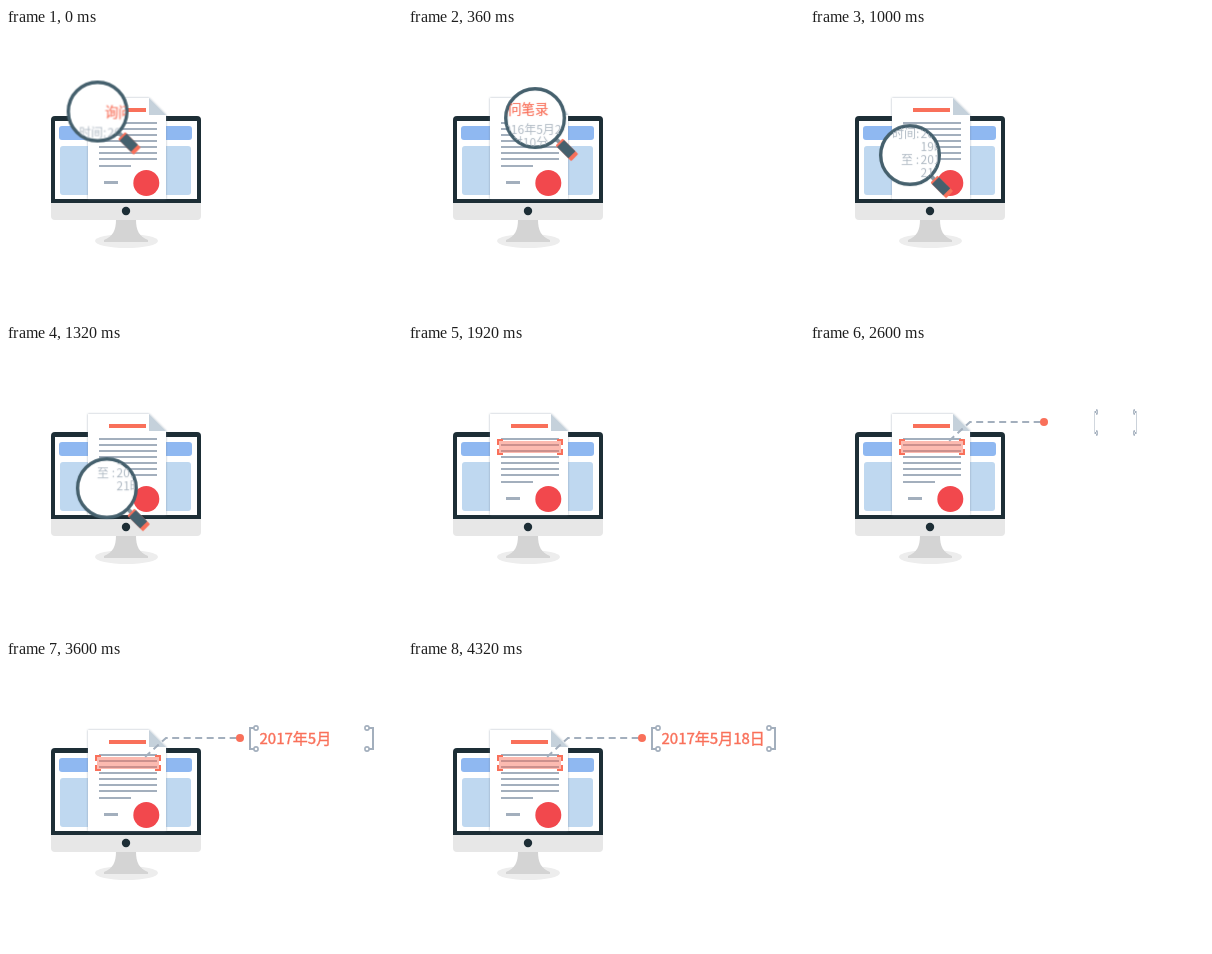
Animation, 396 px wide and 288 px high, one loop 5 s. Source, as an HTML page:

```html
<!DOCTYPE html>
<html lang="zh">
<head>
<meta charset="utf-8">
<title>Document date lookup</title>
<style>
  :root { --coral: #f9705a; --gray: #a3afbd; --slate: #45606d; --dark: #1d2e36; }
  html, body { margin: 0; width: 100%; height: 100%; overflow: hidden; background: #fff; }
  body { position: relative; font-family: "Noto Sans CJK SC", "Noto Sans CJK", "Noto Sans", sans-serif; }
  svg { display: block; width: 396px; height: 288px; }

  .lens, .note, .mark, .trail, .dot, .frame, .date { animation: 5s linear infinite; }
  .lens { animation-name: lens, lens-out; }
  .note { animation-name: note; }
  .mark { animation-name: mark; }
  .trail { animation-name: trail; stroke-dasharray: 100 200; }
  .dot { animation-name: dot; transform-origin: 234px 78px; }
  .frame { animation-name: frame; transform-origin: 305.5px 78px; }

  .title { font-size: 13.3px; fill: var(--coral); stroke: var(--coral); stroke-width: .2; }
  .rows { font-size: 12px; fill: #b0bac4; }

  .date {
    position: absolute; left: 253.5px; top: 69px; height: 18px;
    font-size: 15px; line-height: 18px; color: var(--coral);
    -webkit-text-stroke: .4px var(--coral);
    white-space: nowrap; overflow: hidden;
    animation-name: type, pulse;
    animation-timing-function: step-end, linear;
  }

  @keyframes lens {
    0% { transform: translate(91.5px, 83.5px); }
    3.6% { transform: translate(111px, 85.5px); }
    7.2% { transform: translate(127px, 90px); }
    9.2% { transform: translate(133.5px, 95.5px); }
    11.2% { transform: translate(138px, 102px); }
    15.6% { transform: translate(122px, 112px); }
    20% { transform: translate(100px, 127px); }
    22.4% { transform: translate(95px, 140px); }
    32%, 100% { transform: translate(109px, 150px); }
  }
  @keyframes lens-out {
    0%, 29.6% { opacity: 1; }
    33.4%, 100% { opacity: 0; }
  }
  /* the enlarged text drifts against the lens */
  @keyframes note {
    0% { transform: translate(-91.5px, -83.5px); }
    3.6% { transform: translate(-117px, -87px); }
    7.2% { transform: translate(-139px, -93px); }
    9.2% { transform: translate(-147.5px, -99.5px); }
    11.2% { transform: translate(-154px, -107px); }
    15.6% { transform: translate(-126px, -114px); }
    20% { transform: translate(-91px, -126px); }
    22.4% { transform: translate(-84px, -140px); }
    32%, 100% { transform: translate(-103px, -154px); }
  }
  @keyframes mark {
    0%, 33.6% { opacity: 0; }
    38.4%, 100% { opacity: 1; }
  }
  @keyframes trail {
    0%, 40% { stroke-dashoffset: 101; }
    44.8% { stroke-dashoffset: 82; }
    49.6%, 100% { stroke-dashoffset: 0; }
  }
  @keyframes dot {
    0%, 48.8% { transform: scale(0); }
    50.4%, 100% { transform: scale(1); }
  }
  @keyframes frame {
    0%, 49.6% { transform: scaleX(0); }
    56.8%, 100% { transform: scaleX(1); }
  }
  @keyframes type {
    0% { width: 0; }
    58.4% { width: .555em; }
    60.8% { width: 1.11em; }
    63.2% { width: 1.665em; }
    65.6% { width: 2.22em; }
    68% { width: 3.22em; }
    70.4% { width: 3.775em; }
    72% { width: 4.775em; }
    74.4% { width: 5.885em; }
    77.6%, 100% { width: 7em; }
  }
  @keyframes pulse {
    0%, 81.6% { opacity: 1; }
    84% { opacity: .5; }
    86.4%, 100% { opacity: 1; }
  }
</style>
</head>
<body>
<svg viewBox="0 0 396 288">
  <defs>
    <clipPath id="glass"><circle r="28.5"/></clipPath>
    <filter id="soft" x="-10%" y="-10%" width="120%" height="120%">
      <feGaussianBlur stdDeviation="1.3"/>
    </filter>
    <mask id="reveal" maskUnits="userSpaceOnUse" x="0" y="0" width="396" height="288">
      <path class="trail" d="M139 97L160 78H231" pathLength="100" fill="none" stroke="#fff" stroke-width="6"/>
    </mask>
    <g id="bracket" fill="none" stroke="#a3afbd" stroke-width="2">
      <path d="M248 68H244V89H248"/>
      <circle cx="250" cy="68" r="2.1" stroke-width="1.6"/>
      <circle cx="250" cy="89" r="2.1" stroke-width="1.6"/>
    </g>
  </defs>

  <!-- monitor -->
  <ellipse cx="120.5" cy="213" rx="31.5" ry="7" fill="#ededed"/>
  <path d="M110 191H130C130 203 133 208 142 212V214H98V212C107 208 110 203 110 191Z" fill="#d4d4d4"/>
  <rect x="45" y="88" width="150" height="104" rx="4" fill="#e7e7e7"/>
  <path d="M45 175V92a4 4 0 0 1 4-4H191a4 4 0 0 1 4 4V175Z" fill="var(--dark)"/>
  <rect x="49" y="93" width="142" height="78" fill="#fff"/>
  <circle cx="120" cy="183" r="4.2" fill="var(--dark)"/>
  <rect x="53" y="98" width="133" height="14" rx="3" fill="#8fb8f1"/>
  <rect x="54" y="118" width="131" height="49" rx="3" fill="#bfd8f0"/>

  <!-- page -->
  <path d="M82 70H143L160 87V171H82Z" fill="#6f8296" opacity=".6" filter="url(#soft)"/>
  <path d="M82 70H143L160 87V171H82Z" fill="#fff"/>
  <path d="M143 70L160 87H143Z" fill="#c5d1db"/>
  <rect x="103" y="80" width="37" height="4" fill="var(--coral)"/>
  <path d="M93 95h58M93 101h58M93 107h58M93 113h58M93 119h58M93 125h58M93 131h58M93 138h32"
        stroke="var(--gray)" stroke-width="2"/>
  <rect x="98" y="153" width="14" height="3" fill="var(--gray)"/>
  <circle cx="140.3" cy="155" r="13" fill="#f2484d"/>

  <!-- highlighted lines -->
  <g class="mark">
    <rect x="91" y="97" width="62" height="12" fill="var(--coral)" opacity=".48"/>
    <path d="M90 101V96H95M149 96H154V101M154 105V110H149M95 110H90V105"
          fill="none" stroke="var(--coral)" stroke-width="2"/>
  </g>

  <!-- connector and result frame -->
  <path d="M139 97L160 78H231" mask="url(#reveal)" fill="none" stroke="var(--gray)"
        stroke-width="2" stroke-dasharray="7 4.5"/>
  <circle class="dot" cx="234" cy="78" r="4" fill="var(--coral)"/>
  <g class="frame">
    <use href="#bracket"/>
    <use href="#bracket" transform="matrix(-1 0 0 1 611 0)"/>
  </g>

  <!-- magnifier -->
  <g class="lens">
    <g transform="rotate(45)">
      <rect x="29" y="-2" width="7" height="4" fill="#8797a1"/>
      <rect x="34" y="-5" width="22" height="10" rx="1" fill="var(--coral)"/>
      <rect x="36" y="-5" width="16" height="10" fill="var(--slate)"/>
    </g>
    <circle r="29.3" fill="#fff" stroke="var(--slate)" stroke-width="3.4"/>
    <g clip-path="url(#glass)">
      <g class="note">
        <text class="title" x="99" y="88.5">询问笔录</text>
        <g class="rows">
          <text x="73" y="108.5">时间:</text>
          <text x="101.5" y="108.5">2016年5月20日</text>
          <text x="101.5" y="121.8">19时10分</text>
          <text x="82" y="135.1">至 :</text>
          <text x="101.5" y="135.1">2016年5月20日</text>
          <text x="101.5" y="148.4">21时30分</text>
        </g>
      </g>
    </g>
  </g>
</svg>
<div class="date">2017年5月18日</div>
</body>
</html>
```
